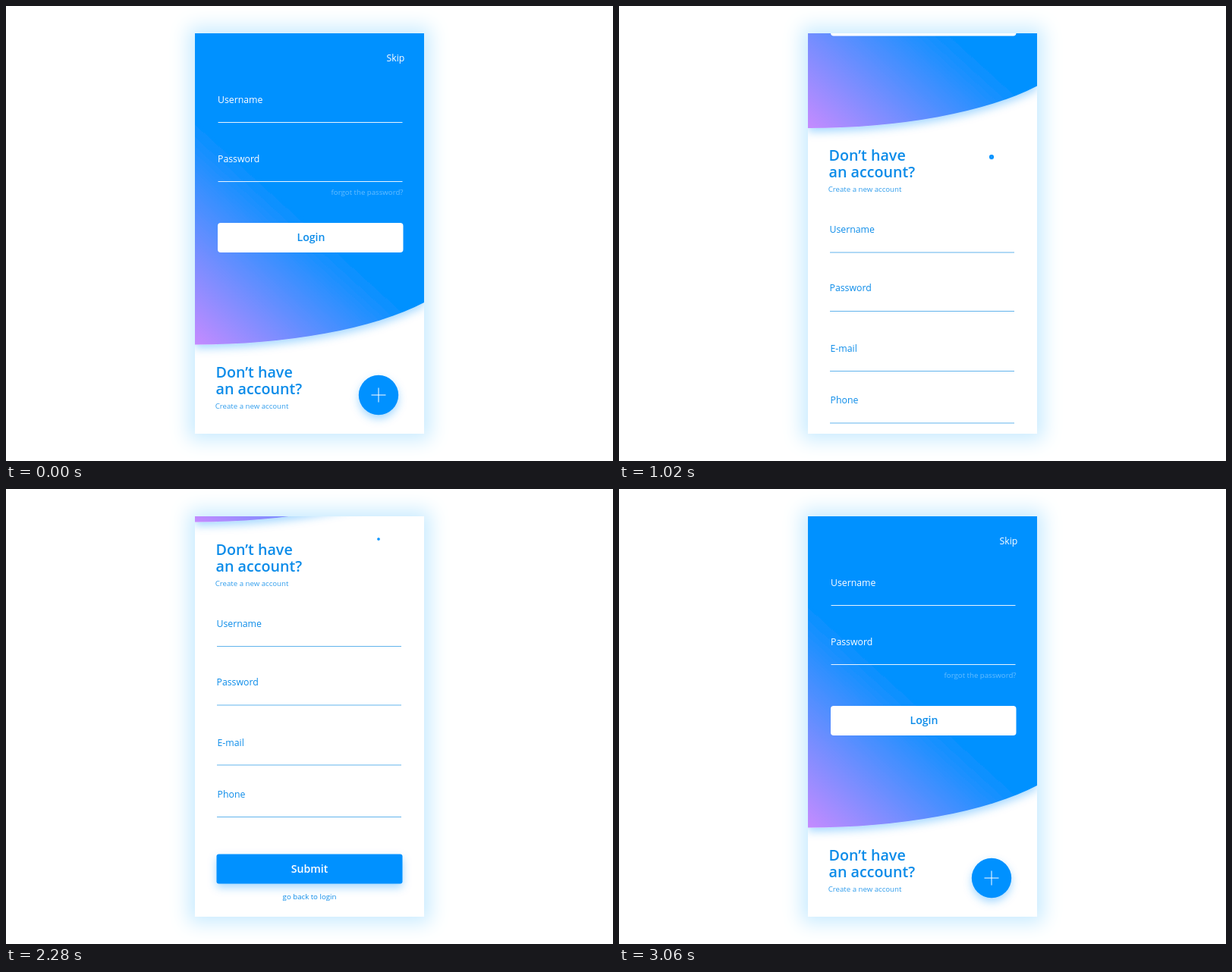
Write an HTML page that moves like this. It is 800x600 px and loops after 3210 ms.

```html
<!DOCTYPE html>
<html lang="en">
<head>
<meta charset="utf-8">
<title>Login and sign-up</title>
<style>
  html, body { margin: 0; width: 100%; height: 100%; overflow: hidden; background: #fff; }
  #phone {
    position: absolute; left: 249px; top: 36px; width: 302px; height: 528px;
    background: #fff; box-shadow: 0 0 24px 8px #c8ebff;
  }
  svg { display: block; overflow: hidden; }
  text { font: 12.3px "Open Sans", "Noto Sans", sans-serif; fill: #0c8ce9; }
  .light text { fill: #fff; }
  .light line { stroke: #fff; stroke-opacity: .9; }
  line { stroke: #62b4ec; }
  text.small { font-size: 9.67px; }
  text.title { font-size: 19.7px; font-weight: 600; }
  text.button { font-size: 14.1px; font-weight: 600; text-anchor: middle; }
</style>
</head>
<body>
<div id="phone">
<svg width="302" height="528" viewBox="249 36 302 528">
  <defs>
    <linearGradient id="sky" gradientUnits="userSpaceOnUse" x1="249" y1="446" x2="398" y2="282">
      <stop stop-color="#c58bff"/>
      <stop offset="1" stop-color="#0091ff"/>
    </linearGradient>
    <filter id="glow" x="-30%" y="-30%" width="160%" height="180%">
      <feDropShadow dx="0" dy="5" stdDeviation="6" flood-color="#0091ff" flood-opacity=".35"/>
    </filter>
  </defs>

  <g id="page">
    <path d="M249 0H551V391A360 122 0 0 1 249 446.5Z" fill="url(#sky)" filter="url(#glow)"/>
    <g class="light">
      <text x="501.5" y="73">Skip</text>
      <text x="279" y="128">Username</text>
      <line x1="279.5" x2="522.5" y1="153.5" y2="153.5"/>
      <text x="279" y="205.5">Password</text>
      <line x1="279.5" x2="522.5" y1="231.5" y2="231.5"/>
      <text class="small" x="523.5" y="248.5" text-anchor="end" opacity=".4">forgot the password?</text>
    </g>
    <rect x="279" y="286" width="244.5" height="39" rx="4" fill="#fff"/>
    <text class="button" x="402" y="310">Login</text>

    <text class="title" x="276.5" y="490">Don’t have</text>
    <text class="title" x="276.5" y="512">an account?</text>
    <text class="small" x="275.7" y="531" opacity=".85">Create a new account</text>

    <g transform="translate(0 403)">
      <text x="277.5" y="181.5">Username</text>
      <line x1="278" x2="521" y1="207.5" y2="207.5"/>
      <text x="277.5" y="259">Password</text>
      <line x1="278" x2="521" y1="285" y2="285"/>
      <text x="278.5" y="338.5">E-mail</text>
      <line x1="278" x2="521" y1="364" y2="364"/>
      <text x="278.5" y="407">Phone</text>
      <line x1="278" x2="521" y1="432.5" y2="432.5"/>
      <rect x="277.5" y="481.5" width="245" height="39" rx="3" fill="#0091ff" filter="url(#glow)"/>
      <text class="button" x="400" y="505.5" style="fill:#fff">Submit</text>
      <text class="small" x="400" y="541" text-anchor="middle">go back to login</text>
    </g>
  </g>

  <g id="plus">
    <circle r="26.2" fill="#0091ff" filter="url(#glow)"/>
    <path d="M-9.5 0H9.5M0 -9.5V9.5" stroke="#fff"/>
  </g>
</svg>
</div>
<script>
const LOOP = 3210, STEP = 30;
const page = document.getElementById('page');
const plus = document.getElementById('plus');

// Ease with horizontal tangents at both ends; x1 and x2 set their lengths.
function ease(x1, x2) {
  return u => {
    if (u <= 0) return 0;
    if (u >= 1) return 1;
    let low = 0, high = 1;
    for (let i = 0; i < 30; i++) {
      const s = (low + high) / 2, r = 1 - s;
      if (3 * r * r * s * x1 + 3 * r * s * s * x2 + s ** 3 < u) low = s;
      else high = s;
    }
    return low * low * (3 - 2 * low);
  };
}

const scrollEase = ease(1 / 3, 2 / 3);
const travelEase = ease(.31, .69);
const shrinkEase = ease(1, .18);
const growEase = ease(.58, .17);
const span = (t, from, to) => (t - from) / (to - from);

// Goes 0 to 1 on the way to the sign-up form and back to 0 on the return.
const thereAndBack = (t, curve) =>
  curve(span(t, 750, 1170)) - curve(span(t, 2280, 2700));

function draw(t) {
  const scroll = 403 * thereAndBack(t, scrollEase);
  const travel = 447 * thereAndBack(t, travelEase);
  const scale = 1 - shrinkEase(span(t, 300, 1380)) + growEase(span(t, 2070, 3060));
  page.setAttribute('transform', `translate(0 ${-scroll})`);
  plus.setAttribute('transform', `translate(491 ${513 - travel}) scale(${scale})`);
  plus.style.display = scale < .04 ? 'none' : '';
}

const start = performance.now();
function tick() {
  const t = (performance.now() - start + 2) % LOOP;
  draw(Math.floor(t / STEP) * STEP);
  requestAnimationFrame(tick);
}
tick();
</script>
</body>
</html>
```
